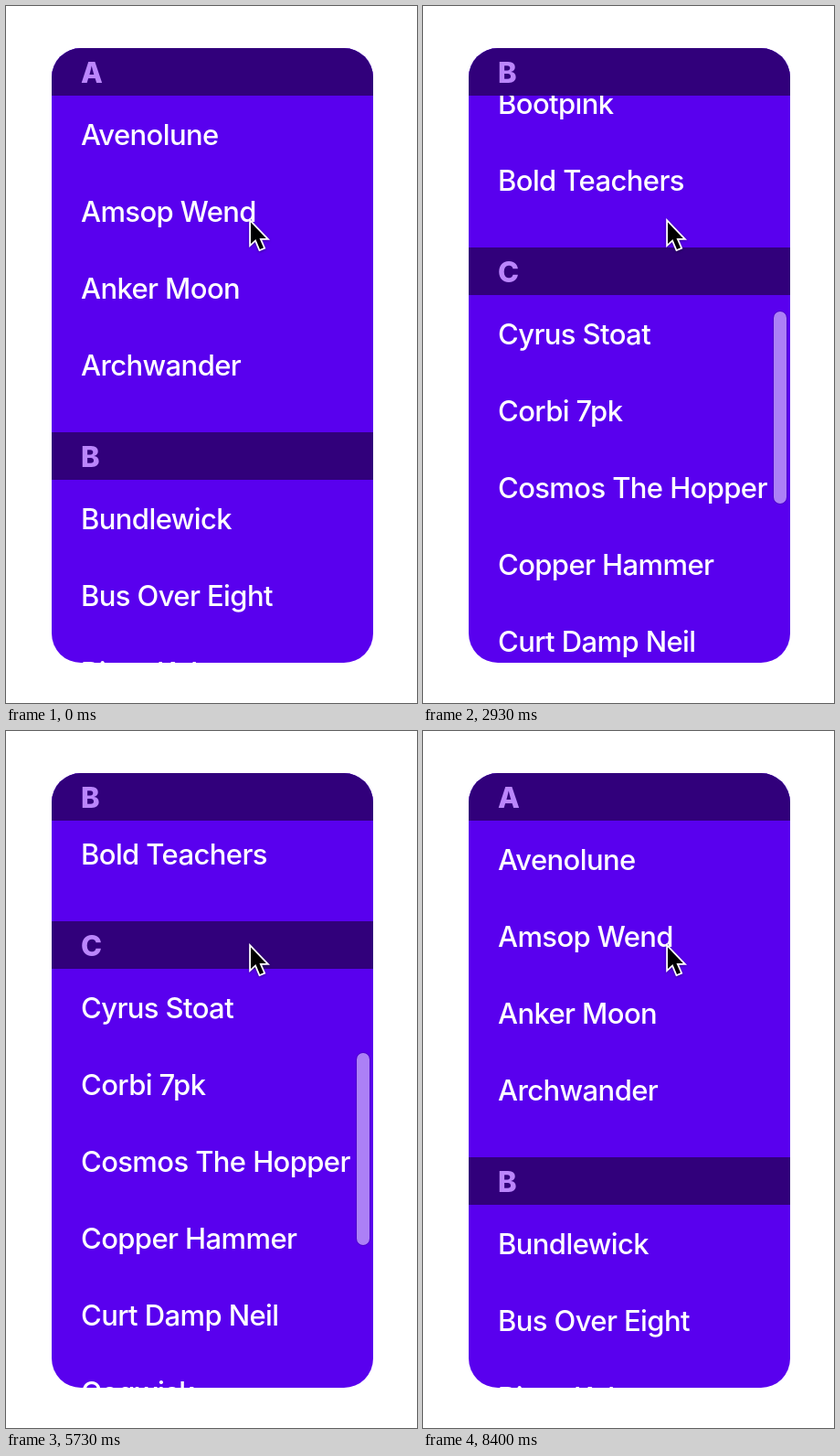
An HTML page with a canvas for the animation above (8470 ms loop, 450 by 762 pixels).

```html
<!DOCTYPE html>
<html lang="en">
<head>
<meta charset="utf-8">
<title>Sticky list headers</title>
<style>
  html, body { margin: 0; width: 100%; height: 100%; overflow: hidden; background: #fff; }
  canvas { display: block; }
</style>
</head>
<body>
<canvas id="stage" width="450" height="762"></canvas>
<script>
const ctx = document.getElementById('stage').getContext('2d');
const LOOP = 8470, FPS = 15;
const CARD = { x: 50, y: 46, w: 352, h: 672, r: 32 };
const HEADER = 52, ROW = 84, GAP = 32, TEXT_X = 82;
const COLOR = { list: '#5900ee', header: '#31007b', letter: '#bb86fc', text: '#fff' };

const sections = [
  ['A', ['Avenolune', 'Amsop Wend', 'Anker Moon', 'Archwander']],
  ['B', ['Bundlewick', 'Bus Over Eight', 'Bitter Kelp', 'Brindalorious',
         'Brown Newts', 'Bootpink', 'Bold Teachers']],
  ['C', ['Cyrus Stoat', 'Corbi 7pk', 'Cosmos The Hopper', 'Copper Hammer',
         'Curt Damp Neil', 'Cogwisk']],
  ['D', ['Dimmer Loam', 'Dusk Mint', 'Dov Maple']],
].map(([letter, names]) => ({ letter, names, height: HEADER + names.length * ROW + GAP }));

const clamp = (v, lo = 0, hi = 1) => Math.min(hi, Math.max(lo, v));
const swing = u => (1 - Math.cos(Math.PI * u)) / 2;
const flick = u => 1 - (1 - u) ** 1.438;

// Each move: start time, end time, start offset, end offset, easing
const moves = [
  [700, 2670, 0, 866, flick],
  [2860, 3680, 866, 1294, swing],
  [3680, 4490, 1294, 848, swing],
  [4490, 5290, 848, 1243, swing],
  [5290, 5930, 1243, 840, swing],
  [5930, 6560, 840, 1284, swing],
  [6560, 8060, 1284, 0, swing],
];

function scrollAt(time) {
  let offset = 0;
  for (const [start, end, from, to, ease] of moves) {
    if (time < start) break;
    offset = from + (to - from) * ease(clamp((time - start) / (end - start)));
  }
  return 2 * Math.round(offset / 2);
}

function label(text, y, weight, color, spacing) {
  ctx.font = `${weight} 31px Inter, sans-serif`;
  ctx.letterSpacing = spacing;
  ctx.fillStyle = color;
  ctx.fillText(text, TEXT_X, y);
}

function drawSection({ letter, names, height }, top) {
  names.forEach((name, i) => label(name, top + 106 + i * ROW, 500, COLOR.text, '-0.6px'));
  const y = Math.min(Math.max(top, CARD.y), top + height - HEADER);
  ctx.fillStyle = COLOR.header;
  ctx.fillRect(CARD.x, y, CARD.w, HEADER);
  label(letter, y + 38, 800, COLOR.letter, '0px');
}

function drawScrollbar(offset, time) {
  const alpha = time < 730 ? 0 : clamp((8400 - time) / 330);
  if (!alpha) return;
  const y = 2 * Math.round((48.6 + 0.3256 * offset) / 2);
  ctx.fillStyle = `rgba(255, 255, 255, ${alpha / 2})`;
  ctx.beginPath();
  ctx.roundRect(384, y, 14, 210, 7);
  ctx.fill();
  ctx.lineWidth = 1;
  ctx.strokeStyle = `rgba(0, 0, 0, ${alpha * 0.15})`;
  ctx.beginPath();
  ctx.roundRect(383.5, y - 0.5, 15, 211, 7.5);
  ctx.stroke();
}

const arrow = new Path2D('M268 236.5V260L273.4 255L278 266L282 264.3L277.5 254H284.8Z');

function drawCursor() {
  ctx.save();
  ctx.lineWidth = 3.6;
  ctx.strokeStyle = '#fff';
  ctx.shadowColor = 'rgba(0, 0, 0, 0.35)';
  ctx.shadowBlur = 3;
  ctx.shadowOffsetY = 1;
  ctx.stroke(arrow);
  ctx.restore();
  ctx.fillStyle = '#000';
  ctx.fill(arrow);
}

function draw(time) {
  const offset = scrollAt(time);
  ctx.fillStyle = '#fff';
  ctx.fillRect(0, 0, 450, 762);

  ctx.save();
  ctx.beginPath();
  ctx.roundRect(CARD.x, CARD.y, CARD.w, CARD.h, CARD.r);
  ctx.clip();
  ctx.fillStyle = COLOR.list;
  ctx.fillRect(CARD.x, CARD.y, CARD.w, CARD.h);
  let top = CARD.y - offset;
  for (const section of sections) {
    drawSection(section, top);
    top += section.height;
  }
  drawScrollbar(offset, time);
  ctx.restore();

  drawCursor();
}

function tick() {
  const step = Math.floor((performance.now() % LOOP + 4) * FPS / 1000);
  draw(10 * Math.round(step * 100 / FPS));
  requestAnimationFrame(tick);
}
tick();
</script>
</body>
</html>
```
